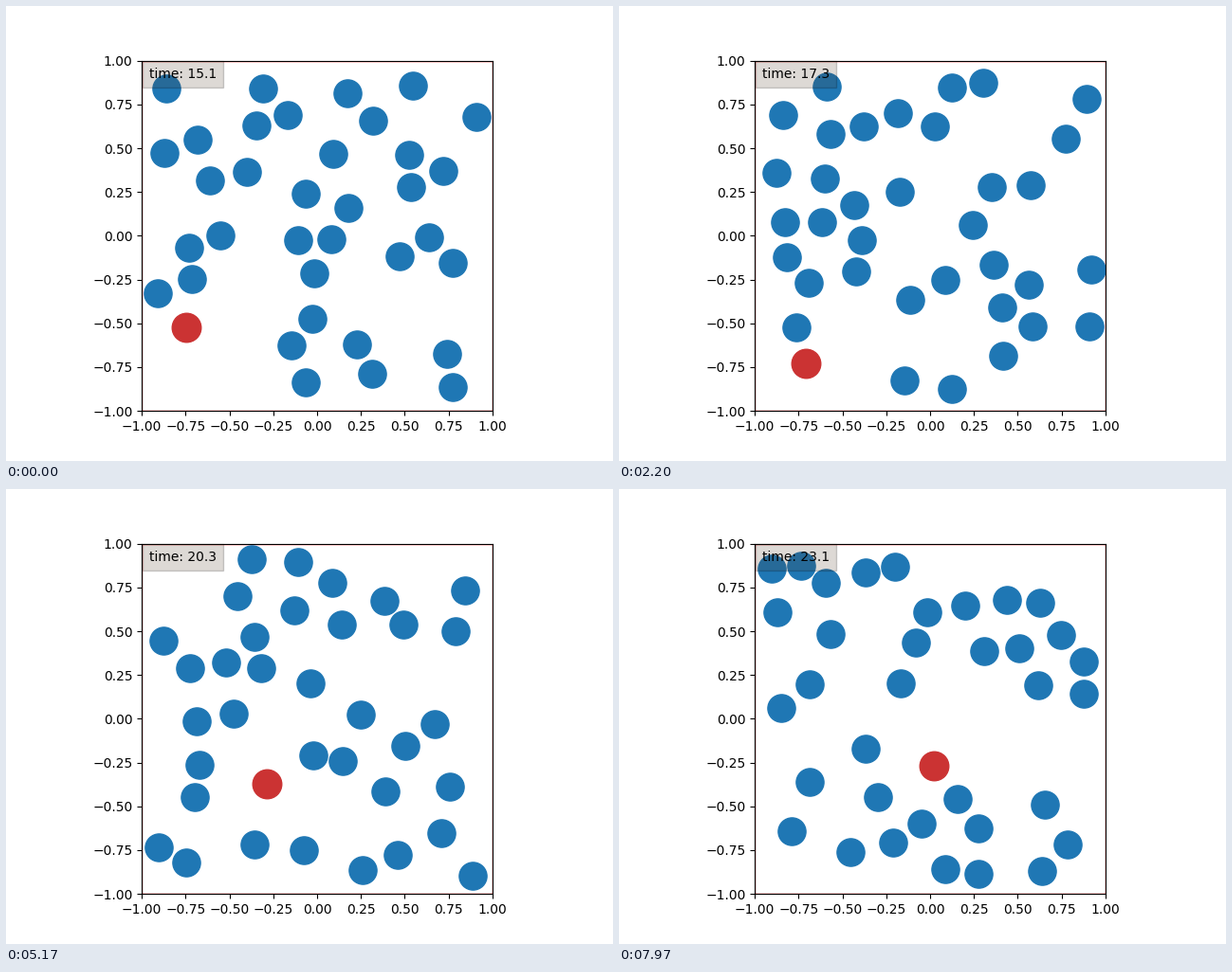
Animation, 640 px wide and 480 px high, one loop 8 s. Source, as a matplotlib script:

```python
import numpy as np
import matplotlib.pyplot as plt
from matplotlib.animation import FuncAnimation

FPS, FRAMES, SUB = 30, 240, 4
START = 15 + 4 / 30            # clock value when the loop begins
R, R_BIG = 0.082, 0.0865       # disc radii in axis units
AIM = 41 / FPS                 # time at which undisturbed discs reach their aim
SPEED = 0.25                   # rms speed the gas settles to

# Each disc: start x, y and the point it heads for, in stage pixels.
DISCS = np.array([
    (169, 87, 161, 119), (271, 87, 305, 97), (360, 92, 334, 123),
    (429, 84, 454, 117), (496, 117, 494, 76), (297, 115, 270, 84),
    (264, 126, 229, 108), (387, 121, 360, 84), (202, 141, 228, 147),
    (167, 155, 194, 146), (345, 156, 306, 158), (425, 157, 426, 178),
    (461, 174, 442, 248), (427, 191, 401, 207), (254, 175, 263, 152),
    (215, 184, 185, 220), (316, 198, 286, 123), (361, 213, 381, 232),
    (308, 247, 250, 252), (343, 246, 291, 248), (325, 282, 278, 302),
    (226, 242, 239, 223), (193, 255, 168, 251), (196, 288, 217, 279),
    (160, 303, 182, 335), (415, 264, 390, 272), (446, 244, 418, 288),
    (471, 271, 486, 293), (323, 330, 321, 287), (301, 358, 301, 380),
    (316, 397, 337, 411), (370, 357, 356, 298), (386, 388, 397, 377),
    (465, 367, 484, 332), (471, 402, 444, 355)], float)

# Waypoints of the big red disc.
RED_T = np.array([0, 41, 91, 128, 181, 215, 239]) / FPS
RED_X = [-0.746, -0.660, -0.763, -0.681, 0.097, -0.094, 0.022]
RED_Y = [-0.522, -0.668, -0.788, -0.592, -0.160, -0.022, -0.266]


def to_axes(px):
    return (px - (328, 242.4)) * (1, -1) / 184.8


def red_at(t):
    return np.array([np.interp(t, RED_T, RED_X), np.interp(t, RED_T, RED_Y)])


def collide(pos, vel):
    """Elastic bounces between discs of equal mass."""
    gap = np.linalg.norm(pos[:, None] - pos[None], axis=2)
    for i, j in np.argwhere(np.triu(gap < 2 * R, 1)):
        d = pos[i] - pos[j]
        dist = np.hypot(*d)
        if dist >= 2 * R:
            continue
        n = d / dist
        push = n * (2 * R - dist) / 2
        pos[i] += push
        pos[j] -= push
        closing = (vel[i] - vel[j]) @ n
        if closing < 0:
            vel[i] -= closing * n
            vel[j] += closing * n


def hit_red(pos, vel, red, red_vel):
    for i in range(len(pos)):
        d = pos[i] - red
        dist = np.hypot(*d)
        if dist < R + R_BIG:
            n = d / dist
            pos[i] = red + n * (R + R_BIG)
            closing = (vel[i] - red_vel) @ n
            if closing < 0:
                vel[i] -= 1.5 * closing * n


def hit_walls(pos, vel):
    out = np.abs(pos) > 1 - R
    vel[out] = -np.sign(pos[out]) * np.abs(vel[out])
    np.clip(pos, R - 1, 1 - R, out=pos)


def simulate():
    pos, aim = to_axes(DISCS[:, :2]), to_axes(DISCS[:, 2:])
    vel = (aim - pos) / AIM
    dt = 1 / (FPS * SUB)
    track = [pos.copy()]
    for step in range(1, FRAMES * SUB):
        t = step * dt
        red = red_at(t)
        red_vel = (red - red_at(t - dt)) / dt
        pos += vel * dt
        collide(pos, vel)
        hit_red(pos, vel, red, red_vel)
        hit_walls(pos, vel)
        if t > AIM:
            rms = np.sqrt((vel ** 2).sum(axis=1).mean())
            vel *= 1 + dt * (1 - rms / SPEED)
        if step % SUB == 0:
            track.append(pos.copy())
    return track


track = simulate()

fig, ax = plt.subplots(figsize=(6.4, 4.8), dpi=100)
ax.set_aspect("equal")
ax.set(xlim=(-1, 1), ylim=(-1, 1))
ax.add_patch(plt.Rectangle((-1, -1), 2, 2, fc="none", ec="red", lw=1))
blue, = ax.plot([], [], "o", ms=21, color="#1f77b4")
big, = ax.plot([], [], "o", ms=22, color="#cb3333")
label = ax.text(0.02, 0.95, "", transform=ax.transAxes, zorder=4,
                bbox=dict(boxstyle="square,pad=0.5", fc="#4c3722",
                          ec="black", alpha=0.19))


def draw(k):
    t = k / FPS
    blue.set_data(track[k][:, 0], track[k][:, 1])
    x, y = red_at(t)
    big.set_data([x], [y])
    label.set_text(f"time: {START + t:.1f}")
    return blue, big, label


anim = FuncAnimation(fig, draw, frames=FRAMES, interval=1000 / FPS,
                     repeat=True, repeat_delay=0, blit=False)
plt.show()
```
